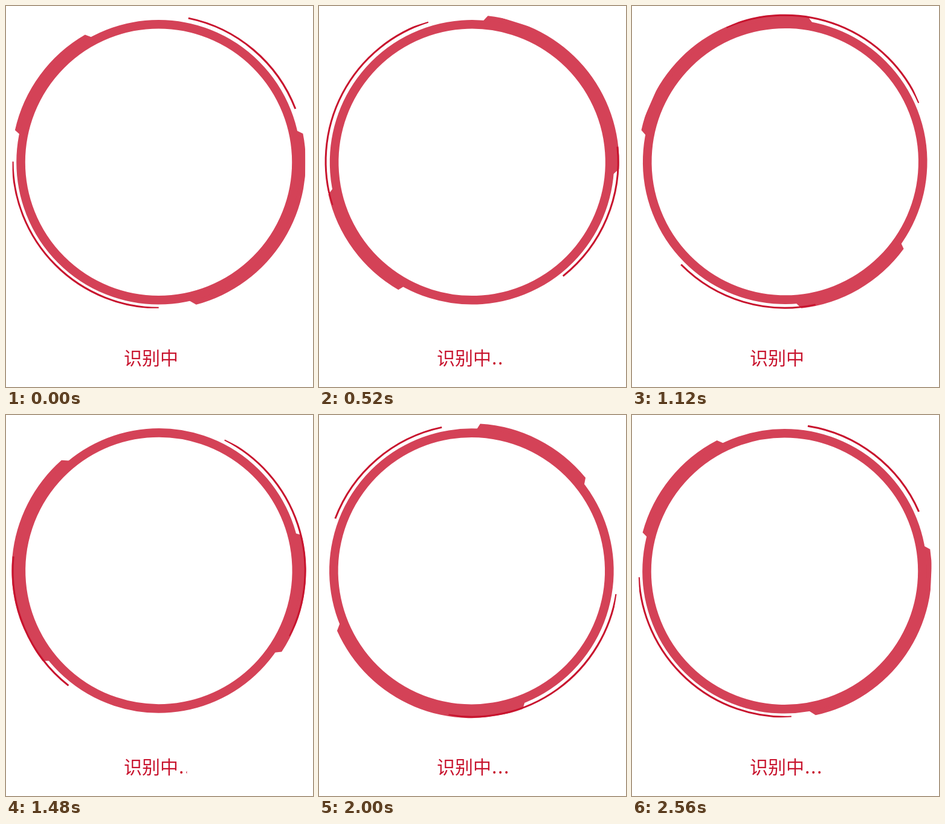
Write an HTML page with a canvas that moves like this. It is 508x630 px and loops after 2.6 s.

```html
<!DOCTYPE html>
<html lang="zh-CN">
<head>
<meta charset="utf-8">
<style>
  html, body { margin: 0; width: 100%; height: 100%; overflow: hidden; background: #fff; }
  canvas { display: block; }
</style>
</head>
<body>
<canvas id="stage" width="508" height="630"></canvas>
<script>
const ctx = document.getElementById('stage').getContext('2d');
const LOOP = 2600, STEP = 40;
const SPEED = 0.1396;          // degrees per ms
const DOTS_RESTART = 1120, DOTS_SPEED = 0.0357;
const RED = '#c8142e', ROSE = '#d44257';
const rad = deg => deg * Math.PI / 180;

// Runs draw() in a frame turned by deg around (x, y)
function turned(x, y, deg, draw) {
  ctx.save();
  ctx.translate(x, y);
  ctx.rotate(rad(deg));
  draw();
  ctx.restore();
}

function clipTo(left, top, right, bottom) {
  ctx.beginPath();
  ctx.rect(left, top, right - left, bottom - top);
  ctx.clip();
}

function strokeArc(radius, width, color, from, to) {
  ctx.beginPath();
  ctx.arc(0, 0, radius, rad(from), rad(to));
  ctx.lineWidth = width;
  ctx.strokeStyle = color;
  ctx.stroke();
}

// Raised part of the ring with bevelled ends
function ridge(from, to, bevelStart, bevelEnd) {
  ctx.beginPath();
  ctx.arc(0, 0, 243.5, rad(from), rad(to));
  ctx.arc(0, 0, 234.8, rad(to + bevelEnd), rad(from - bevelStart), true);
  ctx.lineTo(230 * Math.cos(rad(from)), 230 * Math.sin(rad(from)));
  ctx.arc(0, 0, 230, rad(from), rad(to));
  ctx.arc(0, 0, 234.8, rad(to + bevelEnd), rad(from - bevelStart), true);
  ctx.closePath();
  ctx.fillStyle = ROSE;
  ctx.fill();
}

function drawRing(angle) {
  const sway = rad(125 - angle);
  const x = 252.8 + 0.5 * Math.cos(sway), y = 257.9 + 0.5 * Math.sin(sway);
  turned(x, y, -angle, () => {
    clipTo(-250, -250, 242.6, 250);
    ridge(192.6, 240, 1.2, 1.8);
    ridge(-11.2, 75.2, 1.6, 2.2);
    strokeArc(228, 14.6, ROSE, 0, 360);
  });
}

function drawLines(angle) {
  turned(253.1, 257.2, angle, () => {
    clipTo(-242.5, -250, 250, 242.5);
    strokeArc(242, 3, RED, -78.4, -21.1);
    strokeArc(242, 3, RED, 90.1, 180);
  });
}

function drawLabel(t) {
  ctx.font = '500 30px "Noto Sans CJK SC", "Noto Sans CJK", sans-serif';
  ctx.fillStyle = RED;
  ctx.fillText('识别中', 195, 593);
  const elapsed = t < DOTS_RESTART ? t : t - DOTS_RESTART;
  ctx.save();
  clipTo(286, 560, 286.5 + Math.min(30, elapsed * DOTS_SPEED), 610);
  for (let i = 0; i < 3; i++) ctx.fillText('.', 286 + 10 * i, 593);
  ctx.restore();
}

function frame() {
  const t = Math.floor(performance.now() % LOOP / STEP) * STEP;
  ctx.fillStyle = '#fff';
  ctx.fillRect(0, 0, 508, 630);
  drawRing(t * SPEED);
  drawLines(t * SPEED);
  drawLabel(t);
  requestAnimationFrame(frame);
}
frame();
</script>
</body>
</html>
```
